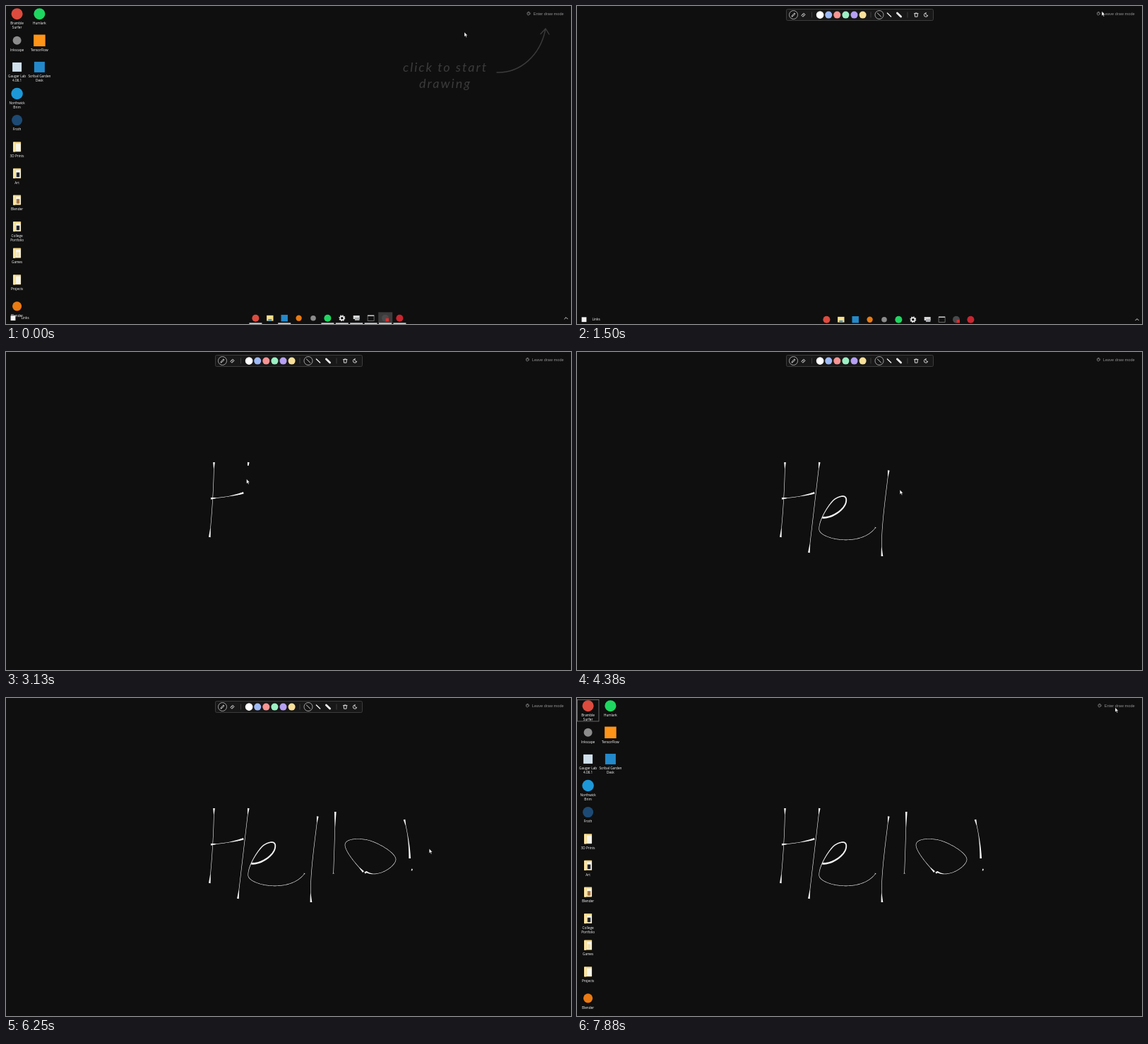
An HTML page for the animation above (7.94 s loop, 800x450 px).

```html
<!DOCTYPE html>
<html lang="en">
<head>
<meta charset="utf-8">
<title>Drawing on the desktop</title>
<style>
  html, body { margin: 0; width: 100%; height: 100%; overflow: hidden; background: #0f0f0f; }
  svg { display: block; width: 100vw; height: 100vh; }
  .label { font: 4.7px "Open Sans", "Noto Sans", sans-serif; fill: #fff; }
  .mid { text-anchor: middle; }
  .mode { font: 5.65px "Liberation Sans", Arial, sans-serif; fill: #929292; text-anchor: end; }
  .hint { font: italic 18px Lato, cursive, sans-serif; letter-spacing: 2px; fill: #3b3b3b; text-anchor: middle; }
  .line { fill: none; stroke-linecap: round; stroke-linejoin: round; }
</style>
</head>
<body>
<svg viewBox="0 0 800 450">
  <g id="desk"></g>
  <g id="hint">
    <text class="hint" x="622" y="93">click to start</text>
    <text class="hint" x="622" y="116">drawing</text>
    <path class="line" stroke="#3b3b3b" stroke-width="1.4" d="M695 94C728 95 757 70 764 32M757 39.5 764 32 769 40"/>
  </g>
  <g id="bar"></g>
  <g id="ink" fill="#f4f4f4"></g>
  <g id="tools"></g>
  <g id="palette" class="line" stroke="#929292" stroke-width=".7">
    <path d="M0-2.3A2.3 2.3 0 1 0 .3 2.3C1.1 2 .1 1 .9 .8H2.1A2.3 2.3 0 0 0 0-2.3M-1-.5h.1M.1-1.1h.1M1.1-.5h.1"/>
  </g>
  <text id="mode" class="mode" x="789.7" y="13"></text>
  <path id="cursor" fill="#fff" stroke="#000" stroke-width=".35" d="M0 0V6.4L1.5 5.1 2.6 7.5 3.6 7 2.5 4.8H4.5Z"/>
</svg>
<script>
const LOOP = 7940, STEP = 62.5, INK_LAG = 32, THIN = .6, THICK = 2.7;
const $ = id => document.getElementById(id);
const clamp = v => Math.max(0, Math.min(1, v));
const ramp = (t, start, length) => clamp((t - start) / length);
const ease = u => (1 - Math.cos(Math.PI * u)) / 2;

// Shape helpers, all centred on x, y
const disc = (x, y, r, fill, more = '') => `<circle cx="${x}" cy="${y}" r="${r}" fill="${fill}" ${more}/>`;
const rect = (x, y, w, h, fill, more = '') =>
  `<rect x="${x - w / 2}" y="${y - h / 2}" width="${w}" height="${h}" fill="${fill}" ${more}/>`;
const line = (d, w = .9, color = '#eee') => `<path class="line" d="${d}" stroke="${color}" stroke-width="${w}"/>`;
const text = (x, y, s, cls = 'label mid') => `<text class="${cls}" x="${x}" y="${y}">${s}</text>`;

// Icons are functions of place and scale
const round = (r, fill) => (x, y, k = 1) => disc(x, y, r * k, fill);
const square = (s, fill) => (x, y, k = 1) => rect(x, y, s * k, s * k, fill);
const folder = (inside = '#f8f5ea') => (x, y) =>
  rect(x, y, 11, 14, '#f0d383', 'rx=".6"') + rect(x + 1.7, y + .8, 7, 11, '#f8f5ea') +
  rect(x + 1.4, y + 2, 4.5, 6.5, inside) + rect(x - 4, y + .4, 3, 13.6, '#ffe6a0');
const files = (x, y) => rect(x, y, 9.4, 7.8, '#ffe08a') + rect(x, y + 2.5, 5, 2.6, '#3f91cf');
const gear = (x, y) => disc(x, y, 2.6, 'none', 'stroke="#eee" stroke-width="1.7"') +
  disc(x, y, 3.9, 'none', 'stroke="#eee" stroke-width="1.2" stroke-dasharray="1.5 1.56"');
const drive = (x, y) => rect(x, y - 1.2, 9, 5, '#d8d8d8') + rect(x + 1, y + 1.3, 6.5, 4, '#a9adb0');
const shell = (x, y) => rect(x, y, 9, 7.5, '#111', 'stroke="#8f8f8f" stroke-width=".7"') +
  rect(x, y - 3.5, 9, 1.4, '#ccc');
const recorder = (x, y) => disc(x, y, 5, '#4a4a4c') + rect(x + 2.8, y + 2.5, 4.4, 4.4, '#e02b2b');

const browser = round(8, '#dd4b3e'), vector = round(6, '#8c8c8c'), music = round(8, '#1ed760');
const editor = square(15, '#2489ca'), modeller = round(6.6, '#ea7a12');

// Desktop: two columns on an even grid
const columns = [[
  [browser, 'Bramble', 'Surfer'],
  [vector, 'Inkscape'],
  [square(13, '#cfe0ec'), 'Gauger Lab', '4.08.1'],
  [round(8.3, '#1c98d8'), 'Northwick', 'Brim'],
  [round(7.5, '#1d4a74'), 'Froth'],
  [folder(), '3D Prints'],
  [folder('#23262c'), 'Art'],
  [folder('#a8763f'), 'Blender'],
  [folder('#23262c'), 'College', 'Portfolio'],
  [folder('#f3e4b0'), 'Games'],
  [folder(), 'Projects'],
  [modeller, 'Blender']
], [
  [music, 'Humlark'],
  [square(16.5, '#ff9419'), 'TensorFlow'],
  [editor, 'Scribal Garden', 'Desk']
]];
$('desk').innerHTML = columns.map((items, col) => items.map(([icon, ...names], row) => {
  const x = 15.6 + 31.8 * col, y = 11.2 + 37.6 * row;
  return icon(x, y) + names.map((s, n) => text(x, y + 14.7 + 6.3 * n, s)).join('');
}).join('')).join('') +
  rect(15.7, 17.7, 30.5, 30.5, 'none', 'id="focus" stroke="#8a8a8a" stroke-width=".7"');

// Taskbar: evenly spaced icons, open programs underlined
const running = new Set([browser, editor, music, gear, drive, shell, recorder]);
const apps = [browser, files, editor, modeller, vector, music, gear, drive, shell, recorder, round(8, '#c9252f')];
$('bar').innerHTML = rect(537.2, 441.8, 20, 17, '#3b3b3b', 'id="active"') +
  rect(10, 441.7, 6.8, 6.8, '#f2f2f2') + text(21.5, 443.4, 'Links', 'label') +
  apps.map((icon, i) => {
    const x = 353.4 + 20.4 * i;
    return icon(x, 441.7, .63) + (running.has(icon) || i === apps.length - 1 ? rect(x, 449.2, 18, 1.6, '#cfd6dc') : '');
  }).join('') + line('M790.8 442.8l2.2-2.2 2.2 2.2');

// Drawing toolbar
const ring = x => disc(x, 12.5, 6, '#141414', 'stroke="#c4c4c4" stroke-width=".8"');
const swatches = ['#fff', '#9db9f6', '#f79494', '#9cf0c3', '#b5a0f4', '#f8e09a'];
$('tools').innerHTML = rect(400.5, 12.5, 208, 16, '#181818', 'rx="2" stroke="#3c3c3c"') +
  ring(306.5) + ring(428) +
  [332.6, 416, 468].map(x => rect(x, 12.5, .8, 8, '#484848')).join('') +
  swatches.map((c, i) => disc(344.1 + 12.1 * i, 12.6, i ? 5 : 5.3, c)).join('') +
  [.9, 1.5, 2.8].map((w, i) => line(`M${425.4 + 14 * i} 10l5.2 5`, w)).join('') +
  line('M304.2 14.8l.5-1.6 3.2-3.2 1.1 1.1-3.2 3.2z') +
  line('M318.2 13l2.8-2.8 2 2-2.8 2.8zM319.6 11.6l2 2') +
  line('M477.5 10.7h5.5M479.2 10h2M478.2 11l.3 4.2h3.5l.3-4.2') +
  line('M494 9.9a2.7 2.7 0 1 0 2.7 3.3 2.3 2.3 0 0 1-2.7-3.3z');

// Pen strokes: curve, start, duration, length of the thick head and tail
const strokes = [
  { d: 'M294.5 156Q294 205 288.3 262', t: 2160, dur: 290 },
  { d: 'M290 207.3Q318 205 336.3 199.3', t: 2600, dur: 260, tail: 20 },
  { d: 'M343.3 156Q336 219 328.4 284', t: 3068, dur: 200 },
  { d: 'M347.5 234.3C361 235.5 379 223 381 212S373 203.5 366 207.5 342 237 342.8 251 402 277 422.8 248.3',
    t: 3440, dur: 520, head: 110, tail: 1 },
  { d: 'M441.3 167.5C437 205 429 258 432 289', t: 4130, dur: 150 },
  { d: 'M466.3 161Q465.3 205 463.6 248.5', t: 4425, dur: 175, head: 22, tail: 1 },
  { d: 'M506 246C496 236 480 217 480 208S498 198 512 201 552 219 552 228.5 526 256 510.5 246l-2.5 1.5',
    t: 4940, dur: 300 },
  { d: 'M564 172Q571 199 571.7 227', t: 5385, dur: 215, tail: 34 },
  { d: 'M574 242.9l1.5 .4', t: 5830, dur: 60 }
].map(({ d, t, dur, head = 9, tail = 13 }) => {
  const el = document.createElementNS('http://www.w3.org/2000/svg', 'path');
  $('ink').append(el);
  el.setAttribute('d', d);
  const total = el.getTotalLength(), n = Math.ceil(total);
  const pts = Array.from({ length: n + 1 }, (_, i) => {
    const s = total * i / n, { x, y } = el.getPointAtLength(s);
    const press = Math.max(clamp(1 - s / head), clamp(1 - (total - s) / tail));
    return { x, y, w: THIN + (THICK - THIN) * press };
  });
  return { t, dur, pts, el };
});

const reached = (k, t) => Math.round((k.pts.length - 1) * ease(ramp(t, k.t, k.dur)));

// Outline of the inked part, down one side and back up the other
function outline({ pts }, count) {
  if (!count) return '';
  const sides = [[], []];
  for (let i = 0; i <= count; i++) {
    const { x, y, w } = pts[i], a = pts[Math.max(0, i - 1)], b = pts[Math.min(pts.length - 1, i + 1)];
    const k = w / 2 / Math.hypot(b.x - a.x, b.y - a.y);
    const dx = (a.y - b.y) * k, dy = (b.x - a.x) * k;
    sides[0].push(`${x + dx} ${y + dy}`);
    sides[1].unshift(`${x - dx} ${y - dy}`);
  }
  return 'M' + sides.flat().join('L') + 'Z';
}

// The pointer follows each stroke and eases between these stops
const stop = (t, x, y) => ({ t, x, y });
const stops = [
  stop(0, 649, 37), stop(100, 649, 37), stop(680, 743, 7.5), stop(1650, 743, 7.5),
  stop(5312, 558, 214.5), stop(6100, 575, 243), stop(6740, 762, 13.5), stop(LOOP, 762, 13.5),
  ...strokes.flatMap(({ t, dur, pts }) => [{ ...pts[0], t }, { ...pts.at(-1), t: t + dur }])
].sort((a, b) => a.t - b.t);

function pointer(t) {
  const k = strokes.find(k => t >= k.t && t <= k.t + k.dur);
  if (k) return k.pts[reached(k, t)];
  const i = stops.findIndex(s => s.t > t), a = stops[i - 1], b = stops[i];
  const u = ease(ramp(t, a.t, b.t - a.t));
  return { x: a.x + (b.x - a.x) * u, y: a.y + (b.y - a.y) * u };
}

const show = (id, alpha) => $(id).setAttribute('opacity', alpha);
const move = (id, x, y) => $(id).setAttribute('transform', `translate(${x} ${y})`);

function render(t) {
  const drawing = t >= 740 && t < 7050;
  $('mode').textContent = (drawing ? 'Leave' : 'Enter') + ' draw mode';
  move('palette', drawing ? 738.4 : 740, 10.7);
  show('desk', 1 - ramp(t, 740, 400) + ramp(t, 7240, 400));
  show('focus', t > 740 ? 1 : 0);
  show('hint', 1 - ramp(t, 740, 400));
  show('tools', ramp(t, 930, 200) - ramp(t, 7120, 200));
  show('active', t < STEP ? 1 : 0);
  move('bar', 0, 18 * ramp(t, 1455, 400));
  for (const k of strokes) k.el.setAttribute('d', outline(k, reached(k, t - INK_LAG)));
  const { x, y } = pointer(t);
  move('cursor', x, y);
}

const start = performance.now();
function tick() {
  const t = (performance.now() - start) % LOOP;
  render(Math.floor((t + 4) / STEP) * STEP % LOOP);
  requestAnimationFrame(tick);
}
tick();
</script>
</body>
</html>
```
